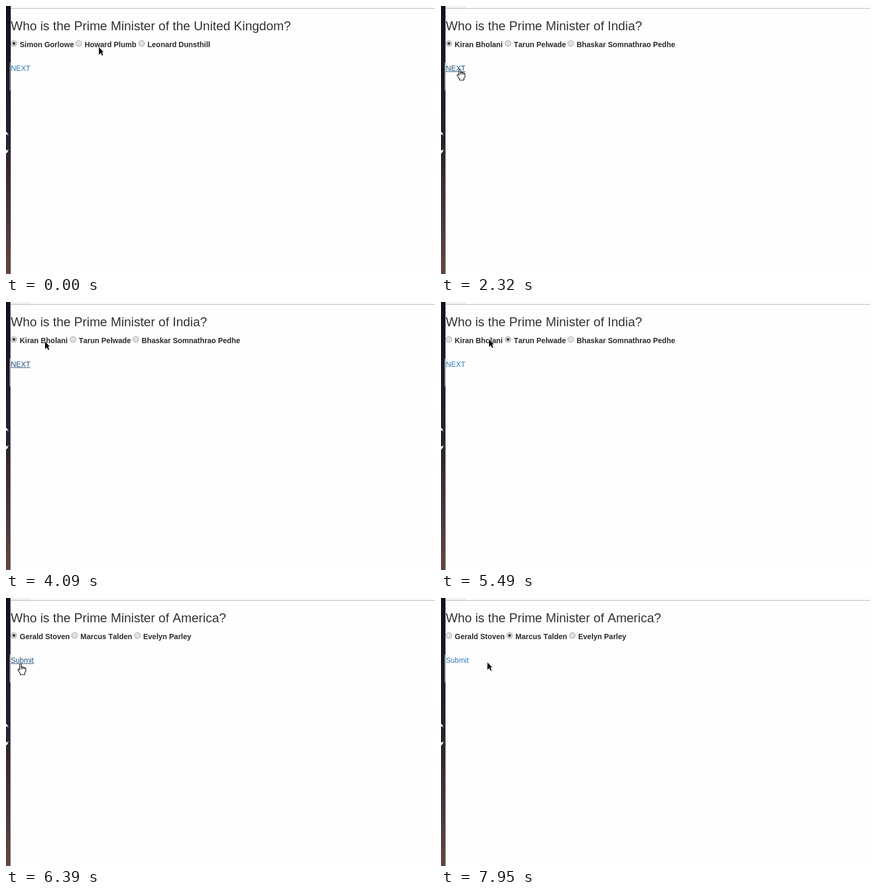
Animation of 813x508 px, one loop 8 s. Source, as an HTML page with a canvas:

```html
<!DOCTYPE html>
<html lang="en">
<head>
<meta charset="utf-8">
<title>Quiz</title>
<style>
  html, body { margin: 0; width: 100%; height: 100%; overflow: hidden; background: #fefefe; }
  canvas { display: block; }
</style>
</head>
<body>
<canvas id="stage" width="813" height="508"></canvas>
<script>
const stage = document.getElementById('stage');
const ctx = stage.getContext('2d', { alpha: false });
const { width: W, height: H } = stage;
const LOOP = 8000;
const LEFT = 9;       // left edge of the page
const STEP = 43;      // time between two pointer positions
const PRESS = 110;    // from pressing an option to its selection
const FONT = '"Liberation Sans", Arial, sans-serif';

const questions = [
  { from: 0, place: 'the United Kingdom', link: 'NEXT',
    names: ['Simon Gorlowe', 'Howard Plumb', 'Leonard Dunsthill'] },
  { from: 2320, place: 'India', link: 'NEXT', picked: 4830,
    names: ['Kiran Bholani', 'Tarun Pelwade', 'Bhaskar Somnathrao Pedhe'] },
  { from: 6390, place: 'America', link: 'Submit', picked: 7640,
    names: ['Gerald Stoven', 'Marcus Talden', 'Evelyn Parley'] }
];

// Pointer moves: start time, end time, where it stops
const home = { x: 176, y: 78 };
const moves = [
  [40, 40, 175, 76],
  [750, 1140, 59, 86],
  [1370, 1460, 35, 119],
  [2940, 3060, 352, 153],
  [3460, 3600, 166, 74],
  [3970, 4090, 74, 75],
  [4270, 4370, 205, 75],
  [5330, 5490, 91, 71],
  [5540, 6120, 27, 124],
  [6480, 6850, 190, 194],
  [6890, 7440, 169, 77],
  [7790, 7950, 88, 122]
];

const arrow = new Path2D('M0 0L9 9.5H5.5L8 15L6 16L3.5 11L0 14Z');
const hand = new Path2D('M-1 12V2Q-1 .5 .5 .5Q2 .5 2 2V7Q3.8 5.6 5 7.6' +
  'Q7 6.4 8 8.4Q10.4 7.6 10.5 10.5V14.5L8.5 18V21.5H0V19L-4.5 12.5Q-4 9.2 -1 12Z');
const fingers = new Path2D('M2 7V11M5 7.6V11M8 8.4V11');
const marks = new Path2D('M0 238L2 240L5 245L0 243ZM0 274L5 272L3 277L0 280Z');

const easeOut = p => 1 - (1 - p) ** 1.8;
const mix = (a, b, p) => Math.round(a + (b - a) * p);

function pointerAt(t) {
  let pos = home;
  for (const [start, end, x, y] of moves) {
    if (t < start) break;
    const gaps = Math.round((end - start) / STEP);
    const done = t >= end ? gaps : Math.floor((t - start) / (end - start) * gaps);
    const p = easeOut((done + 1) / (gaps + 1));
    pos = { x: mix(pos.x, x, p), y: mix(pos.y, y, p) };
  }
  return pos;
}

function rect(color, x, y, w, h) {
  ctx.fillStyle = color;
  ctx.fillRect(x, y, w, h);
}

function disc(color, x, y, r) {
  ctx.fillStyle = color;
  ctx.beginPath();
  ctx.arc(x, y, r, 0, Math.PI * 2);
  ctx.fill();
}

// Draws a line of text and returns its width
function text(str, x, y, style, color) {
  ctx.font = `${style} ${FONT}`;
  ctx.fillStyle = color;
  ctx.fillText(str, x, y);
  return ctx.measureText(str).width;
}

function drawBackdrop(later) {
  rect('#fefefe', 0, 0, W, H);
  const shade = ctx.createLinearGradient(0, 0, 0, H);
  shade.addColorStop(0, '#11111e');
  shade.addColorStop(0.5, '#28222e');
  shade.addColorStop(1, '#634643');
  rect(shade, 0, 0, LEFT, H);
  ctx.fillStyle = '#eee';
  ctx.fill(marks);
  rect('#c9c9cd', 7, 107, 1, 53);
  if (later) {
    rect('#8a8a8c', LEFT - 1, 0, 1, H);
    rect('#f1f1f1', LEFT, 0, 38, 4);
  }
  rect('#b0b0b0', LEFT, 4, W, 1);
}

function drawRadio(x, y, checked) {
  disc('#a2a2a2', x, y, 6);
  disc('#e1e1e1', x, y, 5);
  if (checked) disc('#444', x, y, 2.8);
}

function drawOptions(names, chosen) {
  let left = LEFT;
  names.forEach((name, i) => {
    const x = Math.round(left);
    drawRadio(x + 6, 71, i === chosen);
    left += 17 + text(name, x + 17, 78, 'bold 14px', '#2b2b2b') + 3.53;
  });
}

function drawLink(label, active) {
  const color = active ? '#23527c' : '#337ab7';
  const width = text(label, LEFT, 123, '14px', color);
  if (active) rect(color, LEFT, 124, Math.round(width), 1);
}

function drawPointer({ x, y }, isHand) {
  ctx.save();
  ctx.translate(x, y);
  ctx.lineJoin = 'round';
  ctx.lineWidth = 1.2;
  ctx.strokeStyle = isHand ? '#000' : '#fff';
  ctx.fillStyle = isHand ? '#fff' : '#000';
  if (isHand) {
    ctx.fill(hand);
    ctx.stroke(hand);
    ctx.stroke(fingers);
  } else {
    ctx.stroke(arrow);
    ctx.fill(arrow);
  }
  ctx.restore();
}

function draw(t) {
  const q = questions.filter(item => t >= item.from).pop();
  const pointer = pointerAt(t);
  const hover = pointer.x < 47 && pointer.y >= 112 && pointer.y < 128;
  const focused = t < q.picked - PRESS;

  drawBackdrop(q.from > 0);
  text(`Who is the Prime Minister of ${q.place}?`, LEFT, 46, '24px', '#333');
  drawOptions(q.names, t >= q.picked ? 1 : 0);
  drawLink(q.link, hover || focused);
  drawPointer(pointer, hover);
}

ctx.fontKerning = 'none';
const began = performance.now();
function tick() {
  draw((performance.now() - began) % LOOP);
  requestAnimationFrame(tick);
}
tick();
</script>
</body>
</html>
```
